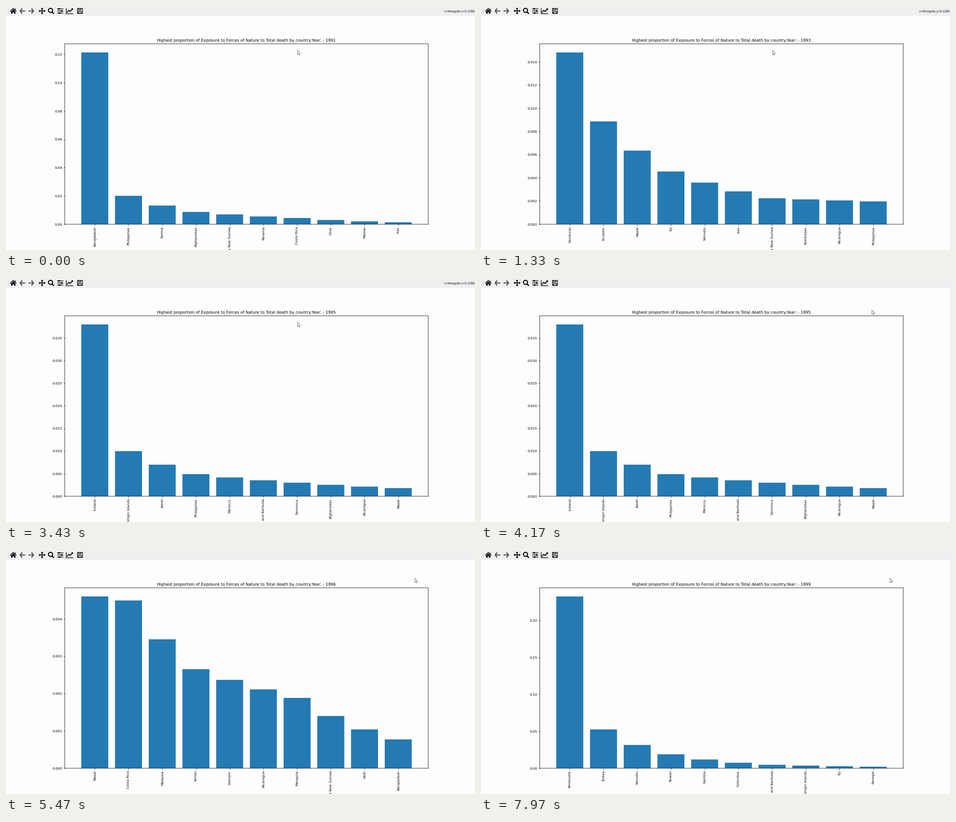
Recreate the animation shown at these times as a matplotlib script. Size 1035 px wide and 541 px high, loop 8000 ms.

```python
import numpy as np
import matplotlib.pyplot as plt
from matplotlib.animation import FuncAnimation
from matplotlib.patches import Circle, Polygon, Rectangle

W, H, DPI = 1035, 541, 64
LOOP, STEP = 8000, 40
FIRST_CHANGE, YEAR_MS = 170, 1066
PAPER, BAR, INK, FADED = "#fdfdfd", "#247ab2", "#000000", "#555555"
TITLE = ("Highest proportion of Exposure to Forces of Nature "
         "to Total death by country.Year: - {}")

PNG = "Papua New Guinea"
ANTIGUA = "Antigua and Barbuda"
USVI = "United States Virgin Islands"

COUNTRIES = {
    1991: ["Bangladesh", "Philippines", "Samoa", "Afghanistan", PNG,
           "Panama", "Costa Rica", "Chile", "Malawi", "Iran"],
    1992: ["Nicaragua", "Turkey", "Kyrgyzstan", "Indonesia", "Afghanistan",
           "Pakistan", "Egypt", PNG, "Philippines", "Nepal"],
    1993: ["Honduras", "Ecuador", "Nepal", "Fiji", "Vanuatu",
           "Iran", PNG, "Azerbaijan", "Nicaragua", "Philippines"],
    1994: ["Haiti", "Colombia", "Moldova", "Madagascar", PNG,
           "Philippines", "Yemen", "Vietnam", "Cambodia", "Afghanistan"],
    1995: ["Iceland", USVI, "Japan", "Philippines", "Morocco",
           ANTIGUA, "Dominica", "Afghanistan", "Nicaragua", "Nepal"],
    1996: ["Nepal", "Costa Rica", "Malaysia", "Yemen", "Vietnam",
           "Nicaragua", "Mongolia", PNG, "Haiti", "Bangladesh"],
    1997: ["Iran", "Vietnam", "Somalia", "Afghanistan", "Costa Rica",
           PNG, "Philippines", "Venezuela", "Ecuador", "Peru"],
    1998: ["Honduras", "Nicaragua", PNG, "Afghanistan", "El Salvador",
           "Saint Kitts and Nevis", "Dominican Republic", "Belize",
           "Guatemala", ANTIGUA],
    1999: ["Venezuela", "Turkey", "Vanuatu", "Taiwan", "Gambia",
           "Colombia", ANTIGUA, USVI, "Fiji", "Senegal"],
}

# Shares at a few ranks; the ranks between fall geometrically
RANKS = [0, 1, 3, 6, 9]
SHARES = {
    1991: (.1214, .0201, .0087, .0044, .0014),
    1992: (.0101, .0062, .0041, .0019, .0008),
    1993: (.01482, .00887, .00455, .00224, .00197),
    1994: (.0162, .0058, .0028, .0015, .0008),
    1995: (.0380, .00998, .00489, .0030, .0018),
    1996: (.004604, .004496, .002655, .001885, .000773),
    1997: (.0121, .0083, .0042, .0018, .0010),
    1998: (.322, .176, .0325, .0085, .0048),
    1999: (.2328, .0526, .0189, .0047, .0021),
}

# Pointer: a long sweep, then a small nudge
REST, SWEPT, PARKED = np.array([(643.2, 98.5), (898.2, 66.5), (902.2, 62.5)])
ARROW = np.array([(0, 0), (0, 9.3), (2.1, 7.4), (3.5, 10.5),
                  (4.9, 9.9), (3.5, 6.9), (6.2, 6.7)])


def pt(px):
    return px * 72 / DPI


def ease(t, start, end):
    u = np.clip((t - start) / (end - start), 0, 1)
    return u * u * (3 - 2 * u)


def shares(year):
    return np.exp(np.interp(range(10), RANKS, np.log(SHARES[year])))


plt.rcParams.update({"font.family": "DejaVu Sans", "text.hinting": "none",
                     "toolbar": "None"})
fig = plt.figure(figsize=(W / DPI, H / DPI), dpi=DPI, facecolor=PAPER)

# Chart
LEFT, RIGHT, TOP, BOTTOM = 129.7, 931.8, 83.9, 483.9
ax = fig.add_axes([LEFT / W, 1 - BOTTOM / H, (RIGHT - LEFT) / W, (BOTTOM - TOP) / H],
                  facecolor=PAPER)
bars = ax.bar(range(10), shares(1991), color=BAR, snap=False)
ax.set_xlim(-0.89, 9.89)
ax.tick_params(labelsize=pt(7.49), length=pt(2.7), width=pt(0.8), pad=pt(2.7))
for spine in ax.spines.values():
    spine.set(linewidth=pt(0.85), snap=False)
title = ax.set_title("", fontsize=pt(8.94), pad=pt(4.5))

# Pixel-space layer for the toolbar and the pointer
ui = fig.add_axes([0, 0, 1, 1], zorder=5)
ui.set(xlim=(0, W), ylim=(H, 0))
ui.axis("off")
MID = 11


def line(points, width, color=INK):
    ui.plot(*zip(*points), color=color, lw=pt(width), solid_capstyle="butt",
            solid_joinstyle="miter", snap=False)


def shape(points, color=INK):
    ui.add_patch(Polygon(points, fc=color, lw=0, snap=False))


def box(x, y, w, h, color=INK):
    ui.add_patch(Rectangle((x, y), w, h, fc=color, lw=0, snap=False))


def frame(x, y, w, h):
    ui.add_patch(Rectangle((x, y), w, h, fill=False, ec=INK, lw=pt(1.4), snap=False))


def home(x):
    line([(x - 6.8, MID + .6), (x, MID - 5.2), (x + 6.8, MID + .6)], 1.7)
    shape([(x - 4.8, MID + 1.2), (x, MID - 2.9), (x + 4.8, MID + 1.2),
           (x + 4.8, MID + 6), (x - 4.8, MID + 6)])
    box(x - 1.3, MID + 2.4, 2.6, 3.6, "#efefef")
    box(x + 3.2, MID - 5.2, 1.8, 3.5)


def nav_arrow(tip, way):
    line([(tip + 6 * way, MID - 5.6), (tip + 1.4 * way, MID),
          (tip + 6 * way, MID + 5.6)], 2.4, FADED)
    line([(tip + 2 * way, MID), (tip + 12.6 * way, MID)], 2.3, FADED)


def pan(x):
    head = np.array([(7.6, 0), (4.4, -3), (4.4, 3)])
    for a in np.arange(4) * np.pi / 2:
        c, s = np.cos(a), np.sin(a)
        line([(x, MID), (x + 6 * c, MID + 6 * s)], 1.8)
        shape(head @ np.array([[c, s], [-s, c]]) + (x, MID))


def zoom(x):
    ui.add_patch(Circle((x, MID - 1.3), 4.6, fill=False, ec=INK, lw=pt(2.1)))
    line([(x + 3, MID + 1.7), (x + 7.5, MID + 6.2)], 2.6)


def sliders(x, width=13.6):
    for row, knob in zip((-1, 0, 1), (.29, .71, .38)):
        y = MID + 4.6 * row
        line([(x, y), (x + width, y)], 1.4)
        box(x + knob * width - 1.7, y - 1.7, 3.4, 3.4)


def chart(x):
    line([(x, MID - 6), (x, MID + 6), (x + 15.2, MID + 6)], 1.4)
    line([(x + 1.8, MID + 3.4), (x + 6, MID - 1.4),
          (x + 8.8, MID + 1.2), (x + 13.4, MID - 3.8)], 1.9)
    shape([(x + 10.6, MID - 5.7), (x + 15, MID - 5.7), (x + 15, MID - 1.3)])


def floppy(x):
    frame(x - 5.5, MID - 5.5, 11, 11)
    frame(x - 3, MID - 5.5, 5, 3.7)
    frame(x - 3.3, MID + 1.3, 6.6, 4.2)


box(0, 0, W, 22, "#efefef")
line([(5.5, 3), (5.5, 19)], 0.8, "#cfcfcf")
home(16)
nav_arrow(29.8, 1)
nav_arrow(62.2, -1)
pan(79.6)
zoom(98.2)
sliders(113)
chart(132.8)
floppy(163.2)

status = ui.text(967, 13.7, "x=Mongolia y=0.1288", fontsize=pt(7),
                 family="Liberation Sans", color="#111111")
pointer = ui.add_patch(Polygon(ARROW, fc="white", ec="#5a5a64", lw=pt(0.8),
                               snap=False))


def update(i):
    t = i * STEP
    year = 1991 + max(0, (t - FIRST_CHANGE) // YEAR_MS + 1)
    values = shares(year)
    for bar, value in zip(bars, values):
        bar.set_height(value)
    ax.set_ylim(0, values[0] * 1.05)
    ax.set_xticks(range(10), COUNTRIES[year], rotation=90)
    title.set_text(TITLE.format(year))

    pos = (REST + (SWEPT - REST) * ease(t, 3900, 4240)
           + (PARKED - SWEPT) * ease(t, 4600, 4720))
    pointer.set_xy(ARROW + pos)
    status.set_visible(pos[1] > TOP)
    return []


anim = FuncAnimation(fig, update, frames=LOOP // STEP, interval=STEP,
                     repeat=True, repeat_delay=0)
plt.show()
```
